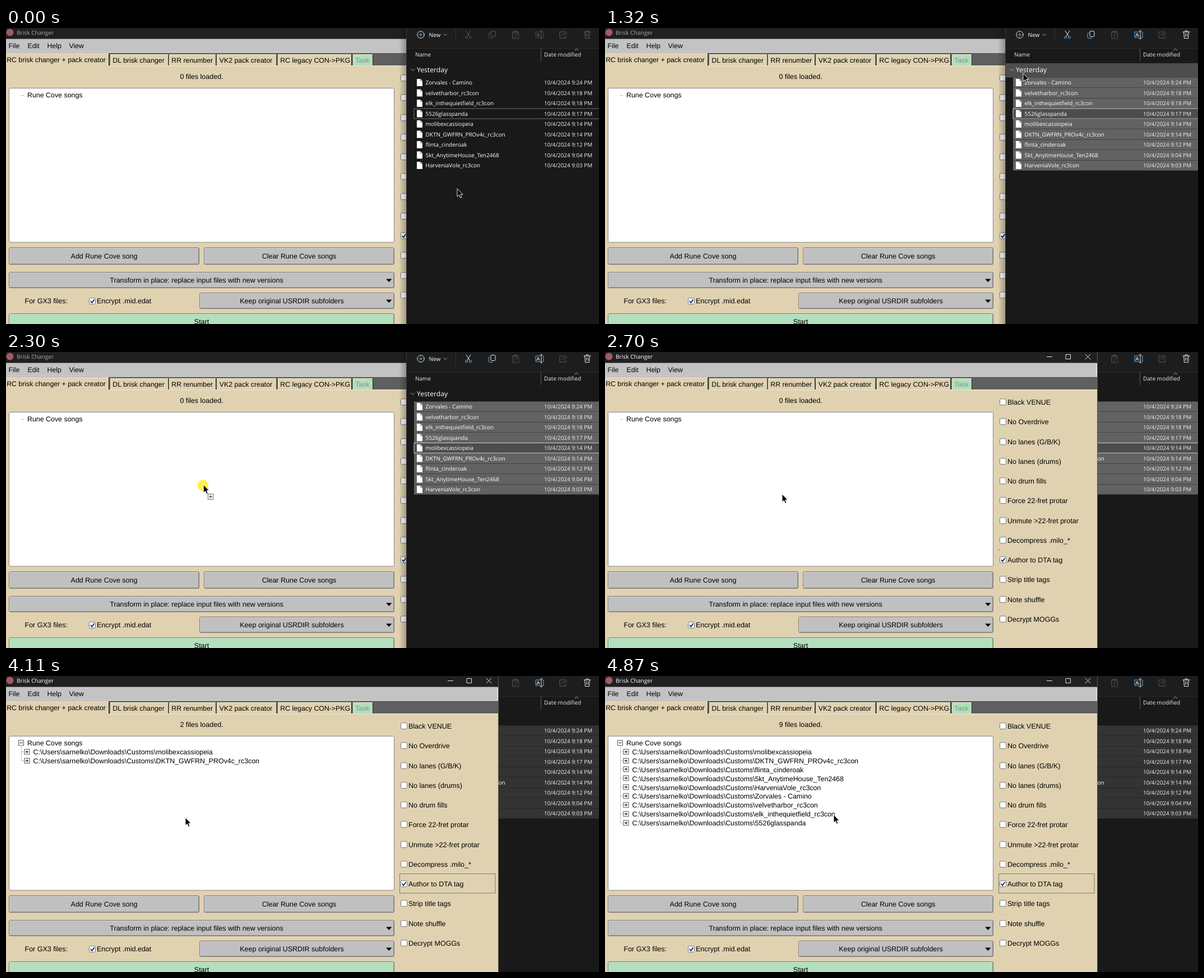
These frames come from a looping animation (1058x529 px, 6790 ms). An HTML page:

```html
<!DOCTYPE html>
<html lang="en">
<head>
<meta charset="utf-8">
<title>Drag and drop import</title>
<style>
  html, body { margin: 0; width: 100%; height: 100%; overflow: hidden; background: #191919; }
  svg { display: block; width: 100vw; height: 100vh; }
  text { white-space: pre; text-rendering: geometricPrecision; }
  .ui { font: 12.5px "Liberation Sans", Arial, sans-serif; fill: #000; }
  .tree { font-size: 12.4px; }
  .tab { font-size: 12.3px; }
  .mid { text-anchor: middle; }
  .ex { font: 10px "Open Sans", "Noto Sans", sans-serif; fill: #fff; }
  .date { font-size: 9.85px; fill: #f0f0f0; }
  .head { fill: #ececec; }
  .group { font-size: 12.2px; }
  .badge { font-weight: 700; }
  .title { font-size: 10.2px; fill: #a9a9a9; }
  .bar { fill: #202020; }
  .active .title { fill: #fff; }
  .line { fill: none; stroke: #e8e8e8; stroke-width: 1; stroke-linejoin: round; stroke-linecap: round; }
  .line .hue { stroke: #5fb2f2; }
  .line.off { stroke: #5d5d5d; }
  .line.off .hue { stroke: #35506a; }
  .line.soft { stroke: #aaa; }
  .dots { fill: none; stroke: #888; stroke-dasharray: 1 1; }
  .tick { fill: none; stroke: #0c2a66; stroke-width: 1.9; }
</style>
</head>
<body>
<svg id="stage" viewBox="0 0 1058 529" preserveAspectRatio="none"></svg>
<script>
const LOOP = 6790;
const files = [
  ['Zorvales - Camino', '9:24'], ['velvetharbor_rc3con', '9:18'],
  ['elk_inthequietfield_rc3con', '9:18'], ['5526glasspanda', '9:17'],
  ['molibexcassiopeia', '9:14'], ['DKTN_GWFRN_PROv4c_rc3con', '9:14'],
  ['flinta_cinderoak', '9:12'], ['5kt_AnytimeHouse_Ten2468', '9:04'],
  ['HarveniaVole_rc3con', '9:03']
];
const options = ['Black VENUE', 'No Overdrive', 'No lanes (G/B/K)', 'No lanes (drums)', 'No drum fills',
  'Force 22-fret protar', 'Unmute >22-fret protar', 'Decompress .milo_*', 'Author to DTA tag',
  'Strip title tags', 'Note shuffle', 'Decrypt MOGGs'];
const loadOrder = [4, 5, 6, 7, 8, 0, 1, 2, 3];
const rowY = i => 97.5 + 18.5 * i;
const treeY = i => 135.7 + 15.87 * i;

// Markup helpers
const text = (x, y, s, cls = 'ui') => `<text x="${x}" y="${y}" class="${cls}">${s}</text>`;
const rect = (x, y, w, h, fill, more = '') => `<rect x="${x}" y="${y}" width="${w}" height="${h}" fill="${fill}" ${more}/>`;
const path = (d, more = 'fill="none"') => `<path d="${d}" ${more}/>`;

function button(x, y, w, h, label, fill = '#c0c0c0', arrow = false) {
  return rect(x + .5, y + .5, w - 1, h - 1, fill, 'rx="2" stroke="#777"')
    + path(`M${x + 1.5} ${y + h - 2}V${y + 1.5}H${x + w - 2}`, 'fill="none" stroke="#fff" stroke-opacity=".3"')
    + path(`M${x + 2} ${y + h - 1.5}H${x + w - 1.5}V${y + 2}`, 'fill="none" stroke="#000" stroke-opacity=".22"')
    + (arrow ? path(`M${x + w - 15} ${y + h / 2 - 2}h10.5l-5.25 5.5z`, 'fill="#000"') : '')
    + text(x + w / 2 - (arrow ? 9 : 0), y + h / 2 + 4.4, label, 'ui mid');
}

function check(x, cy, label, on) {
  return rect(x + .5, cy - 5.5, 11, 11, '#fff', 'rx="2" stroke="#767676"')
    + (on ? path(`M${x + 2.8} ${cy}l2.5 3l4.2 -6`, 'class="tick"') : '')
    + text(x + 14, cy + 4.4, label);
}

function tab(x, w, label, fill = '#e0d2b1', ink = '#000') {
  return rect(x, 47, w, 20.5, fill) + rect(x, 47, w, 1, '#f4ecd6') + rect(x, 47, 1, 20, '#f4ecd6')
    + rect(x + w, 47, 1, 20, '#222')
    + `<text x="${x + 4.3}" y="61.5" class="ui tab" style="fill:${ink}">${label}</text>`;
}

const knob = (x, y, plus) => rect(x - 4.5, y - 4.5, 9, 9, '#fff', 'stroke="#555"')
  + path(`M${x - 2.5} ${y}h5` + (plus ? `M${x} ${y - 2.5}v5` : ''), 'stroke="#000"');

const leafMarkup = loadOrder.map((f, i) => {
  const y = Math.round(treeY(i)) - .5;
  return `<g class="leaf">${path(`M27.5 ${y - (i ? 16 : 10)}V${y}H33`, 'class="dots"')}${knob(37.5, y, true)}`
    + text(48.5, treeY(i) + 4.4, 'C:\\Users\\sarnelko\\Downloads\\Customs\\' + files[f][0], 'ui tree') + '</g>';
}).join('');

const appMarkup = `<g id="app">
  ${rect(0, 0, 878, 529, '#e0d2b1')}
  <rect class="bar" width="878" height="20"/>
  <circle cx="7" cy="8" r="6.5" fill="#a35a62"/>
  ${text(19, 12.3, 'Brisk Changer', 'ex title')}
  ${path('M788.5 8.5h9M822.5 4.5h8v8h-8zM857 4l9 9m0-9l-9 9', 'class="line"')}
  ${rect(0, 19.5, 877, 24.5, '#c3c3c3')}${rect(0, 43.5, 878, 1, '#f2f2f2')}${rect(876.5, 20, 1, 24, '#f2f2f2')}
  ${[[4.5, 'File'], [38.5, 'Edit'], [73.5, 'Help'], [112.5, 'View']].map(([x, s]) => text(x, 36.3, s, 'ui tab')).join('')}
  ${rect(0, 44.5, 878, 23, '#5f5f5f')}${rect(184, 67, 694, 1.3, '#f4ecd6')}
  ${rect(0, 45, 183, 25, '#e0d2b1')}${rect(0, 45, 183, 1, '#f4ecd6')}${rect(183, 46, 1, 21, '#222')}
  ${text(1.2, 61.2, 'RC brisk changer + pack creator', 'ui tab')}
  ${tab(186, 103.5, 'DL brisk changer')}${tab(291, 83, 'RR renumber')}${tab(376.5, 106, 'VK2 pack creator')}
  ${tab(485, 131, 'RC legacy CON->PKG')}${tab(619, 35, 'Task', '#b2dfbc', '#7d9683')}
  <text id="count" class="ui mid" x="349" y="91"></text>
  <g id="left">
    ${rect(5.5, 107.5, 687, 275.5, '#fff', 'rx="2" stroke="#858585"')}
    ${path('M27 120.5h6', 'class="dots"')}
    <g id="leaves">${leafMarkup}${knob(27, 119.5, false)}</g>
    ${text(38, 124.2, 'Rune Cove songs', 'ui tree')}
    ${button(5, 392, 340, 31, 'Add Rune Cove song')}${button(353, 392, 340, 31, 'Clear Rune Cove songs')}
    ${button(5, 436, 688, 29, 'Transform in place: replace input files with new versions', '#c0c0c0', true)}
    ${text(33.5, 492.3, 'For GX3 files:')}${check(148, 488, 'Encrypt .mid.edat', true)}
    ${button(345, 473, 348, 29, 'Keep original USRDIR subfolders', '#c0c0c0', true)}
    ${button(5, 510, 688, 29, 'Start', '#b2dfbc')}
  </g>
  <g id="opts">
    ${options.map((s, i) => check(704, Math.round(89 + 35.27 * i) + .3, s, i === 8)).join('')}
    ${path('M702 353.5h4', 'id="dash" stroke="#333" stroke-dasharray="1 1"')}
    ${rect(702.5, 353.5, 170.5, 34.5, 'none', 'id="ring" stroke="#222" stroke-dasharray="1 1"')}
  </g>
  ${rect(878, 0, 1, 529, '#5f594b')}
</g>`;

const icon = (x, live, body) => `<g class="line ${live ? 'live' : 'off'}" transform="translate(${x} 12)">${body}</g>`;
const hue = 'class="hue"';
const toolbar = icon(825, true, path('M-2.4 3L4 -7M2.4 3L-4 -7') + `<circle cx="-3.4" cy="4.8" r="2" ${hue}/><circle cx="3.4" cy="4.8" r="2" ${hue}/>`)
  + icon(867, true, rect(-2, -6.5, 8, 10, 'none', 'rx="2"') + path('M-4 -3.5q-2 0 -2 2v5.5q0 2.5 2.5 2.5h4.5', hue))
  + icon(909, false, path('M-2 -5h-3v12h4M2 -5h3v3M-2 -6.5h4v2.5h-4z') + rect(0, -1, 6, 8, 'none', `rx="1" ${hue}`))
  + icon(952, true, path('M1 -5h-8v10h8M5 -5h2v10h-2', hue) + path('M-5 3l2.5 -6l2.5 6M-4 1h3M3 -7v14M1.5 -7h3M1.5 7h3'))
  + icon(994, false, path('M-1 -5h-5v11h11v-4') + path('M-3 2q1 -5 6 -5M2 -7l5 4l-5 4z', hue))
  + icon(1037, true, path('M-6 -5h12M-4.5 -5l1 11.5h7l1 -11.5M-2 -5v-2h4v2M-1.5 -2v5M1.5 -2v5'));

const explorerMarkup = `<g id="explorer">
  <linearGradient id="fade"><stop offset="0" stop-opacity="0"/><stop offset="1" stop-opacity=".28"/></linearGradient>
  ${rect(701, 0, 14, 529, 'url(#fade)')}
  ${rect(714.5, 0, 344, 529, '#191919')}${rect(715, 0, 343, 36, '#1d1d1d')}${rect(715, 36, 343, 1, '#2a2a2a')}
  ${rect(714, 0, 1, 529, '#3a3a3a')}${rect(802, 0, 1, 24, '#333')}${rect(954, 36, 1, 23, '#5a5a5a')}
  <g class="line"><circle cx="740" cy="12" r="6.2"/>${path('M737 12h6M740 9v6', hue)}</g>
  ${text(754.5, 15.7, 'New', 'ex')}
  ${path('M781 11l2.7 2.5l2.7 -2.5M1014.5 40l3.3 -2.8l3.3 2.8', 'class="line soft"')}
  ${toolbar}
  ${text(730, 51.3, 'Name', 'ex head')}${text(960, 51.3, 'Date modified', 'ex head')}
  ${rect(715, 63, 343, 25.5, '#4d4d4d', 'id="hover"')}
  ${path('M722 73l3.5 3.5l3.5 -3.5', 'class="line soft"')}${text(733, 79.3, 'Yesterday', 'ex group')}
  ${files.map(([name, time], i) => {
    const y = rowY(i);
    return rect(728, y - 9, 340, 18.1, 'none', 'class="row"')
      + path(`M733 ${y - 6.5}h6.5l3.5 3.5v9.5h-10z`, 'fill="#fff"')
      + path(`M739.5 ${y - 6.5}v3.5h3.5`, 'fill="#ccc" stroke="#777" stroke-width=".6"')
      + text(748.5, y + 3.7, name, 'ex') + text(960, y + 3.7, `10/4/2024 ${time} PM`, 'ex date');
  }).join('')}
</g>`;

const sheet = (x, y) => path(`M${x} ${y}h33l15 15v51h-48z`, 'fill="#f6f6f6" stroke="#a2a2a2" stroke-width=".8"');
const ghostMarkup = `<g id="ghost">
  ${rect(725, 82, 88, 88, '#fdfdfd', 'rx="3"')}
  ${[0, 1, 2, 3].map(i => sheet(740 + 2.3 * i, 90 + 2.3 * i)).join('')}
  ${path('M779.9 96.9v15h15z', 'fill="#ddd" stroke="#a2a2a2" stroke-width=".8"')}
  ${rect(761.5, 119, 13.5, 13.5, '#0a6ec4')}
  ${text(768.2, 129.4, '9', 'ex mid badge')}
</g>`;

const cursorMarkup = `<g id="cursor">
  <circle id="press" cx="-1" cy="1" r="10" fill="#ffee2e" fill-opacity=".85"/>
  ${path('M0 0V14.2L3.3 11.3L5.5 16.4L7.9 15.4L5.7 10.4H10z', 'fill="#000" stroke="#fff" stroke-width=".9"')}
  <g id="plus">${rect(8, 16.5, 9.5, 9.5, '#fff', 'stroke="#444" stroke-width=".8"')}${path('M10 21.25h5.5M12.75 18.5v5.5', 'stroke="#222"')}</g>
</g>
<g id="deny" fill="none" stroke="#d0564c" stroke-width="1.5"><circle cx="787" cy="183" r="5"/>${path('M783.5 179.5l7 7')}</g>`;

const stage = document.getElementById('stage');
stage.innerHTML = `<g id="wins">${appMarkup}${explorerMarkup}</g>
  ${rect(0, 0, 0, 0, '#0078d7', 'id="marquee" fill-opacity=".3" stroke="#0078d7"')}${ghostMarkup}${cursorMarkup}`;

const $ = id => document.getElementById(id);
const [wins, app, explorer, count, marquee, cursor] =
  ['wins', 'app', 'explorer', 'count', 'marquee', 'cursor'].map($);
const rows = [...stage.querySelectorAll('.row')];
const leaves = [...stage.querySelectorAll('.leaf')];
const live = [...stage.querySelectorAll('.live')];
const show = (id, on) => $(id).setAttribute('visibility', on ? 'inherit' : 'hidden');
const set = (el, attrs) => { for (const k in attrs) el.setAttribute(k, attrs[k]); };

// Pointer track: time, x, y
const track = [
  [0, 805, 288], [210, 805, 288], [420, 905, 315], [490, 905, 315], [770, 830, 205], [1050, 746, 81],
  [1320, 746, 82], [1600, 769, 172], [1810, 769, 172], [1880, 738, 160], [1950, 591, 155],
  [2160, 425, 205], [2370, 316, 255], [4041, 316, 255], [4110, 320, 254], [4590, 408, 249], [LOOP, 408, 249]
];
function pointer(t) {
  const i = track.findIndex(k => k[0] > t);
  const [t0, x0, y0] = track[i - 1], [t1, x1, y1] = track[i];
  const u = (t - t0) / (t1 - t0);
  return [x0 + (x1 - x0) * u, y0 + (y1 - y0) * u];
}

// The picture advances in 70 ms ticks, realigned after each pause
const STARTS = [0, 280, 1320, 2700, 3170, 4110];
const LOAD_STEP = 68.5;
function tick(t) {
  const start = STARTS.filter(s => s <= t).pop();
  const step = start === 4110 ? LOAD_STEP : 70;
  return start + Math.floor((t - start) / step) * step;
}

// Files loaded so far, and which panes are blank while they rebuild
function loading(t) {
  if (t < 3170) return { n: 0 };
  if (t < 4110) return { n: 1, left: t < 3240 };
  const k = Math.min(11, Math.round((t - 4110) / LOAD_STEP));
  const blank = k < 10 && k % 2 === 1;
  return { n: k < 10 ? 2 + Math.ceil(k / 2) : k - 2, left: blank, right: blank };
}

function draw(time) {
  const t = tick(time);
  const [x, y] = pointer(t);
  const dropped = t >= 2700, dim = t >= 2900;
  const marking = t > 490 && t < 1320;

  const front = dropped ? app : explorer;
  if (wins.lastElementChild !== front) wins.append(front);
  app.classList.toggle('active', dropped);
  show('dash', dropped && t < 2830);
  show('ring', t >= 2830);

  const load = loading(t);
  count.textContent = `${load.n} files loaded.`;
  show('left', !load.left);
  show('opts', !load.right);
  show('leaves', load.n > 0);
  leaves.forEach((el, i) => el.setAttribute('display', i < load.n ? 'inline' : 'none'));

  const top = t <= 490 ? 999 : marking ? y : 0;
  const focus = t < 1670 ? 3 : 4;
  rows.forEach((el, i) => {
    const picked = top < rowY(i) + 9, ring = i === focus && !dim;
    set(el, {
      fill: !picked ? 'none' : dim ? '#333' : ring ? '#4d4d4d' : '#626262',
      stroke: !ring ? 'none' : picked ? '#cfcfcf' : '#707070'
    });
  });
  const any = top < rowY(8) + 9;
  live.forEach(el => el.classList.toggle('off', !any));
  show('hover', t >= 1320 && t < 1390);

  show('marquee', marking);
  if (marking) set(marquee, { x, y, width: 905 - x, height: 316 - y });

  const dragging = t >= 1810 && t < 1950;
  show('ghost', dragging);
  show('deny', dragging);
  show('press', t >= 490 && t < 1320 || t >= 1670 && !dropped);
  show('plus', t >= 1950 && !dropped);
  cursor.setAttribute('transform', `translate(${x} ${y - 1})`);
}

function frame() {
  draw(performance.now() % LOOP);
  requestAnimationFrame(frame);
}
frame();
</script>
</body>
</html>
```
